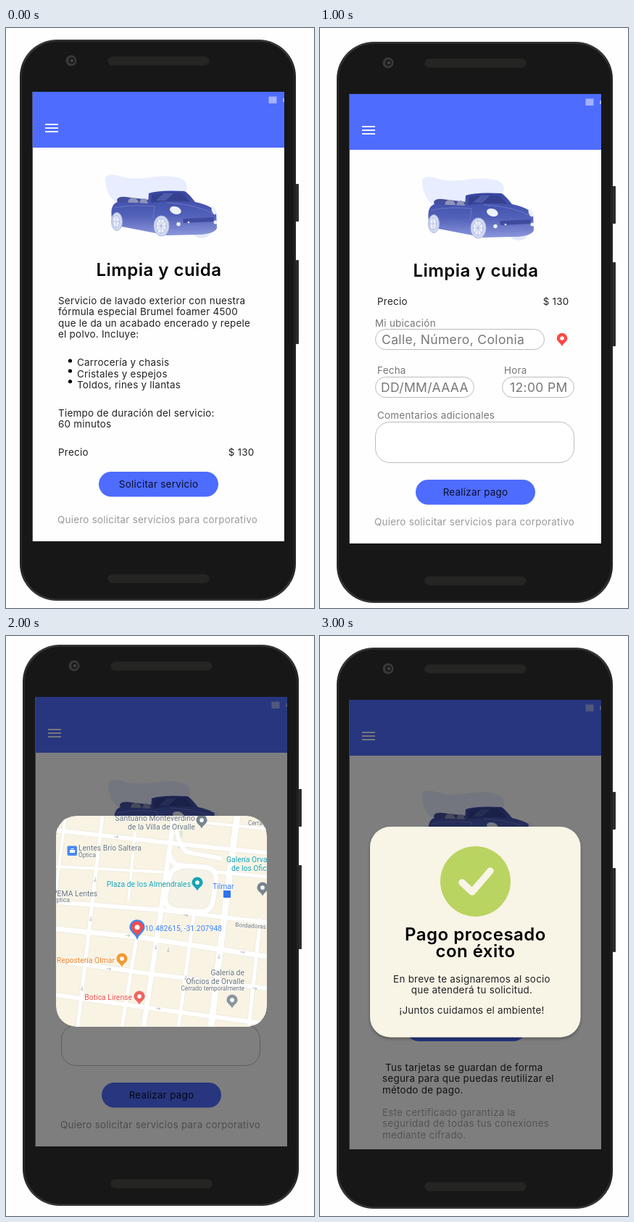
An HTML page that plays this animation: 425 px wide and 800 px high, repeating every 4000 ms.

```html
<!DOCTYPE html>
<html lang="es">
<head>
<meta charset="utf-8">
<title>Servicio de lavado</title>
<style>
html, body { margin: 0; width: 100%; height: 100%; overflow: hidden; background: #fefefe; }
svg { display: block; width: 100vw; height: 100vh; }
text { font: 13.4px Inter, sans-serif; letter-spacing: .02em; fill: #222; }
.mid { text-anchor: middle; }
.end { text-anchor: end; }
.title { font-size: 24px; font-weight: 600; fill: #000; text-anchor: middle; }
.label { fill: #777; }
.soft { fill: #999; }
.pale { fill: #aaa; }
.input { font-size: 17.5px; fill: #777; }
.button { fill: #0b0f2c; text-anchor: middle; }
.field { fill: #fff; stroke: #bbb; }
#map text { font: 10.4px Roboto, sans-serif; letter-spacing: 0; fill: #68737e;
  paint-order: stroke; stroke: #fffdf6; stroke-width: 1.5px; }
#map .small { font-size: 8.3px; }
#map .teal { fill: #129eaf; }
#map .blue { fill: #3b7ded; }
#map .orange { fill: #e8812a; }
#map .red { fill: #e8504c; }
</style>
</head>
<body>
<svg viewBox="0 0 425 800">
  <defs>
    <linearGradient id="paint" x2="0" y2="1">
      <stop offset="0" stop-color="#3947a4"/><stop offset=".55" stop-color="#5160b8"/><stop offset="1" stop-color="#8b96db"/>
    </linearGradient>
    <linearGradient id="rim">
      <stop offset="0" stop-color="#252523"/><stop offset=".03" stop-color="#343432"/><stop offset=".97" stop-color="#343432"/><stop offset="1" stop-color="#20201f"/>
    </linearGradient>
    <clipPath id="screen"><path d="M36.5 88H384V708H36.5z"/></clipPath>
    <clipPath id="card"><rect x="69" y="248" width="291" height="291" rx="28"/></clipPath>
    <filter id="shadow"><feDropShadow dx="0" dy="2" stdDeviation="2" flood-opacity=".35"/></filter>
    <g id="car">
      <path fill="#e8eeff" d="M137 207C140 199 153 203 164 206C190 211 206 202 230 205C247 207 252 213 249 227C246 246 228 250 200 247L158 244C143 239 136 219 137 207z"/>
      <ellipse cx="270" cy="279" rx="13" ry="11" fill="#e3eafc"/>
      <path fill="#444f9d" d="M153 237Q155 232 165 233L198 237V247L155 245z"/>
      <path fill="#8e94b9" d="M168 241q1-7 7-7q7 0 8 8zM184 242q1-7 6-7q5 0 6 8z"/>
      <path fill="url(#paint)" d="M146 263C144 250 147 242 154 240L196 242L197 228Q211 223 246 225Q251 227 261 240Q284 245 290 254L291 276Q288 284 266 285L222 286L160 274z"/>
      <path fill="#35418f" d="M200 241L201 230Q215 226 243 228L255 240Q225 237 200 241z"/>
      <path fill="#4d5bac" d="M207 238L218 228L231 228L220 238z"/>
      <path fill="none" stroke="#7481ca" stroke-width=".8" d="M150 248Q175 243 205 246M205 246L203 262M222 241Q265 243 289 258M224 275Q255 281 290 275"/>
      <path fill="#3e4b9f" d="M244 263L287 261L286 267L245 269z"/>
      <g fill="#d2daf1" stroke="#abb6df">
        <ellipse cx="153" cy="267" rx="7.5" ry="12.5"/><ellipse cx="214.5" cy="273" rx="10.5" ry="14"/>
      </g>
      <g fill="#edf1fc" stroke="#a8b4dc" stroke-width=".8">
        <ellipse cx="152" cy="267" rx="4.5" ry="8.5"/><ellipse cx="214" cy="273" rx="7" ry="10"/>
        <path d="M152 259V275M148 267H156M214 263V283M207 273H221M209 266L219 280M219 266L209 280"/>
      </g>
      <g fill="#edf1fb">
        <ellipse cx="234" cy="251.500" rx="8" ry="5.200" transform="rotate(18 234 251)"/>
        <ellipse cx="287" cy="252" rx="3" ry="5.500" transform="rotate(-22 287 252)"/>
        <circle cx="238" cy="270.500" r="2.700"/><circle cx="289" cy="268" r="2.500"/><circle cx="252" cy="268" r="1.300"/>
      </g>
    </g>
  </defs>
  <g id="phone"></g>
</svg>
<script>
const text = (x, y, s, cls = '') => `<text x="${x}" y="${y}" class="${cls}">${s}</text>`;
const lines = (x, ys, rows, cls) => rows.map((s, i) => text(x, ys[i], s, cls)).join('');
const rect = (x, y, w, h, r, attr) => `<rect x="${x}" y="${y}" width="${w}" height="${h}" rx="${r}" ${attr}/>`;
const field = (x, y, w, h, r) => rect(x + .5, y + .5, w - 1, h - 1, r, 'class="field"');
const button = (x, y, s) => rect(x, y, 165, 34.5, 17.25, 'fill="#4e6cfe"') + text(x + 82.5, y + 22, s, 'button');
const group = (id, body, attr = '') => `<g id="${id}" ${attr}>${body}</g>`;
const road = (d, w) => `<path d="${d}" stroke-width="${w}"/>`;
const pin = (x, y, color, k = .95, dot = '#fff', attr = '') =>
  `<g transform="translate(${x} ${y}) scale(${k})"><path fill="${color}" ${attr} d="M0 11C-2 6-8 4-8-1a8 8 0 0 1 16 0C8 4 2 6 0 11z"/><circle cy="-1" r="3" fill="${dot}"/></g>`;
const corporate = y => text(71, y, 'Quiero solicitar servicios para corporativo', 'soft');

const body = rect(19, 16, 381, 774, 51, 'fill="url(#rim)"') + rect(22, 18.5, 375, 769, 49, 'fill="#171717"') +
  rect(400, 215, 4, 52, 1, 'fill="#2c2c2a"') + rect(400, 320, 4, 116, 1, 'fill="#2c2c2a"') +
  [39.5, 753.5].map(y => rect(140.5, y, 140, 12, 6, 'fill="#252524" stroke="#20201d"')).join('') +
  '<circle cx="90" cy="45" r="7.500" fill="#393938"/><circle cx="90.500" cy="45" r="4.500" fill="#1c1c1c"/><circle cx="91" cy="45" r="2" fill="#484847"/>';

const header = '<path fill="#fefefe" d="M36.500 88H384V708H36.500z"/><path fill="#4e6cfe" d="M36.500 88H384V165H36.500z"/>' +
  '<path fill="#a3b2ff" d="M362.500 94.500h11v9.500h-11zM382 97h2v5h-2z"/><path stroke="#edf0ff" stroke-width="2" d="M54 133h18M54 138h18M54 143h18"/>';

const service = '<use href="#car"/>' + text(211, 341.5, 'Limpia y cuida', 'title') +
  lines(72, [380.5, 396, 411.5, 427], ['Servicio de lavado exterior con nuestra', 'fórmula especial Brumel foamer 4500',
    'que le da un acabado encerado y repele', 'el polvo. Incluye:']) +
  [459, 473, 487.5].map(y => `<circle cx="88.500" cy="${y}" r="2.600"/>`).join('') +
  lines(98, [466, 481.5, 497], ['Carrocería y chasis', 'Cristales y espejos', 'Toldos, rines y llantas']) +
  lines(72, [535.5, 551, 589.5], ['Tiempo de duración del servicio:', '60 minutos', 'Precio']) +
  text(342.5, 589.5, '$ 130', 'end') + button(128, 612, 'Solicitar servicio') + corporate(683);

const form = '<use href="#car"/>' + text(211, 339.5, 'Limpia y cuida', 'title') +
  text(75, 378.5, 'Precio') + text(339.5, 378.5, '$ 130', 'end') +
  text(72, 408.5, 'Mi ubicación', 'label') + field(72, 412, 234, 29, 14) + text(81, 433, 'Calle, Número, Colonia', 'input') +
  pin(330, 426, '#fb4a4a', .92) +
  text(75, 474, 'Fecha', 'label') + field(72, 478, 137, 29, 14) + text(80, 499, 'DD/MM/AAAA', 'input') +
  text(250, 474, 'Hora', 'label') + field(247, 478, 100, 29, 14) + text(258, 499, '12:00 PM', 'input') +
  text(75, 535.5, 'Comentarios adicionales', 'label') + field(72, 540, 275, 57, 20) +
  button(128, 620, 'Realizar pago') + corporate(682.5);

const paid = '<use href="#car" y="11"/>' + button(115, 524.5, '') +
  text(86, 599.5, 'Tus tarjetas se guardan de forma') +
  lines(82, [615, 630.5], ['segura para que puedas reutilizar el', 'método de pago.']) +
  lines(82, [661.5, 677, 692.5], ['Este certificado garantiza la', 'seguridad de todas tus conexiones', 'mediante cifrado.'], 'pale');

const streets = [
  ['M69 268L230 286L360 299', 6], ['M69 318L225 326', 4], ['M69 367L215 378L360 395', 6], ['M69 404L180 415L360 442', 7],
  ['M69 448L200 466L360 486', 6], ['M69 495L190 512L360 535', 6], ['M260 256L360 266', 4], ['M285 325L360 332', 5],
  ['M133 248L99 539', 5], ['M82 248L69 350', 4], ['M232 248L214 378L190 539', 7], ['M319 248L300 395L283 539', 9],
  ['M181 412L160 539', 5], ['M259 385L238 539', 5], ['M351 390L335 539', 5], ['M178 270L169 365', 4],
  ['M226 302Q229 318 248 317L276 319Q291 322 290 337L285 369Q281 382 262 380L235 378Q218 375 220 359L225 334Q228 318 248 317', 7],
  ['M235 248Q233 283 249 298L298 307', 6]
];
const arrows = [[152, 277, 97], [117, 390, 187], [105, 486, 187], [168, 413, 97], [224, 433, 187], [326, 436, 97],
  [123, 336, 187], [248, 385, 97], [294, 442, 187], [248, 471, 187], [142, 459, 97], [343, 486, 97], [207, 429, 187], [210, 514, 97]];

const map = rect(69, 248, 291, 291, 28, 'fill="#f9f3e3"') +
  '<path fill="#f6f2e8" d="M229 321H283L278 375H222z"/><path fill="#d5ebc8" d="M238 269h6l-1 9h-6zM237 286h6v7h-6z"/>' +
  [['#ece8dd', 1.5], ['#fff', 0]].map(([c, extra]) => `<g fill="none" stroke="${c}">` +
    streets.map(([d, w]) => road(d, w + extra)).join('') + '</g>').join('') +
  arrows.map(([x, y, a]) => `<path transform="translate(${x} ${y}) rotate(${a})" d="M0 3V-3M-1.500 -1L0-3L1.500-1" fill="none" stroke="#b0b4b8" stroke-width=".8"/>`).join('') +
  lines(261, [254.5, 267], ['Santuario Monteverdino', 'de la Villa de Orvalle'], 'end') + pin(270, 255, '#77858f') +
  text(334, 261, 'Cerrado', 'small') +
  rect(84.5, 289.5, 13.5, 13.5, 2, 'fill="#4b88f5"') + '<path fill="#fff" d="M88 295h7v4h-7zM89.500 293h4v1h-4z"/>' +
  text(100, 296, 'Lentes Brío Saltera') + text(100, 304.5, 'Óptica', 'small') +
  lines(304, [311.5], ['Galería Orvallense'], 'teal') + text(311, 324, 'de los Oficios', 'teal') +
  text(255, 346, 'Plaza de los Almendrales', 'end teal') + pin(264, 341, '#16a4b4') +
  text(285, 348.5, 'Tilmar', 'blue') + rect(300, 351, 10, 10, 1, 'fill="#2c74e8"') + pin(354, 348, '#77858f') +
  text(64, 358.5, 'VEMA Lentes') + text(64, 367, 'Óptica', 'small') +
  `<g transform="rotate(4 316 401)">${text(316, 401, 'Bordadoras', 'small')}</g>` +
  pin(181, 403, '#f44b4b', 1.18, '#fff', 'stroke="#3f86ee" stroke-width="2"') + text(191.5, 407, '10.482615, -31.207948', 'blue') +
  text(150, 451, 'Repostería Olmar', 'end orange') + pin(160, 446, '#f09a34') +
  text(174, 502, 'Botica Lirense', 'end red') + pin(184, 498, '#f06460') +
  lines(329, [467.5, 479.5], ['Galería de', 'Oficios de Orvalle'], 'end') +
  text(329, 489, 'Cerrado temporalmente', 'end small') + pin(312, 503, '#8a969e');

const success = rect(65, 263, 290.5, 290.5, 28, 'fill="#f8f4e6" filter="url(#shadow)"') +
  '<circle cx="210.500" cy="338.500" r="48.500" fill="#bad461"/>' +
  '<path d="M192 340L206 353L231 324" fill="none" stroke="#f8f5e8" stroke-width="9.500" stroke-linecap="round" stroke-linejoin="round"/>' +
  lines(210.5, [419.5, 442.5], ['Pago procesado', 'con éxito'], 'title') +
  lines(205.5, [477.5, 493, 520.5], ['En breve te asignaremos al socio', 'que atenderá tu solicitud.', '¡Juntos cuidamos el ambiente!'], 'mid');

const phone = document.getElementById('phone');
phone.innerHTML = body + group('content',
  header + group('service', service) + group('form', form) + group('paid', paid) +
  group('dim', '<path d="M36 88H384V708H36z" opacity=".5"/>'), 'clip-path="url(#screen)"') +
  group('map', `<g clip-path="url(#card)">${map}</g>`, 'transform="translate(-4 4)"') + group('success', success);

const scenes = [
  { x: 0, y: 0, show: ['service'] },
  { x: 4, y: 3, show: ['form'] },
  { x: 4, y: -4, show: ['form', 'dim', 'map'] },
  { x: 4, y: 0, show: ['paid', 'dim', 'success'] }
];
const layers = ['service', 'form', 'paid', 'dim', 'map', 'success'].map(id => document.getElementById(id));

function draw() {
  const { x, y, show } = scenes[Math.floor(performance.now() / 1000) % scenes.length];
  phone.setAttribute('transform', `translate(${x} ${y})`);
  for (const layer of layers) layer.style.display = show.includes(layer.id) ? '' : 'none';
  requestAnimationFrame(draw);
}
draw();
</script>
</body>
</html>
```
